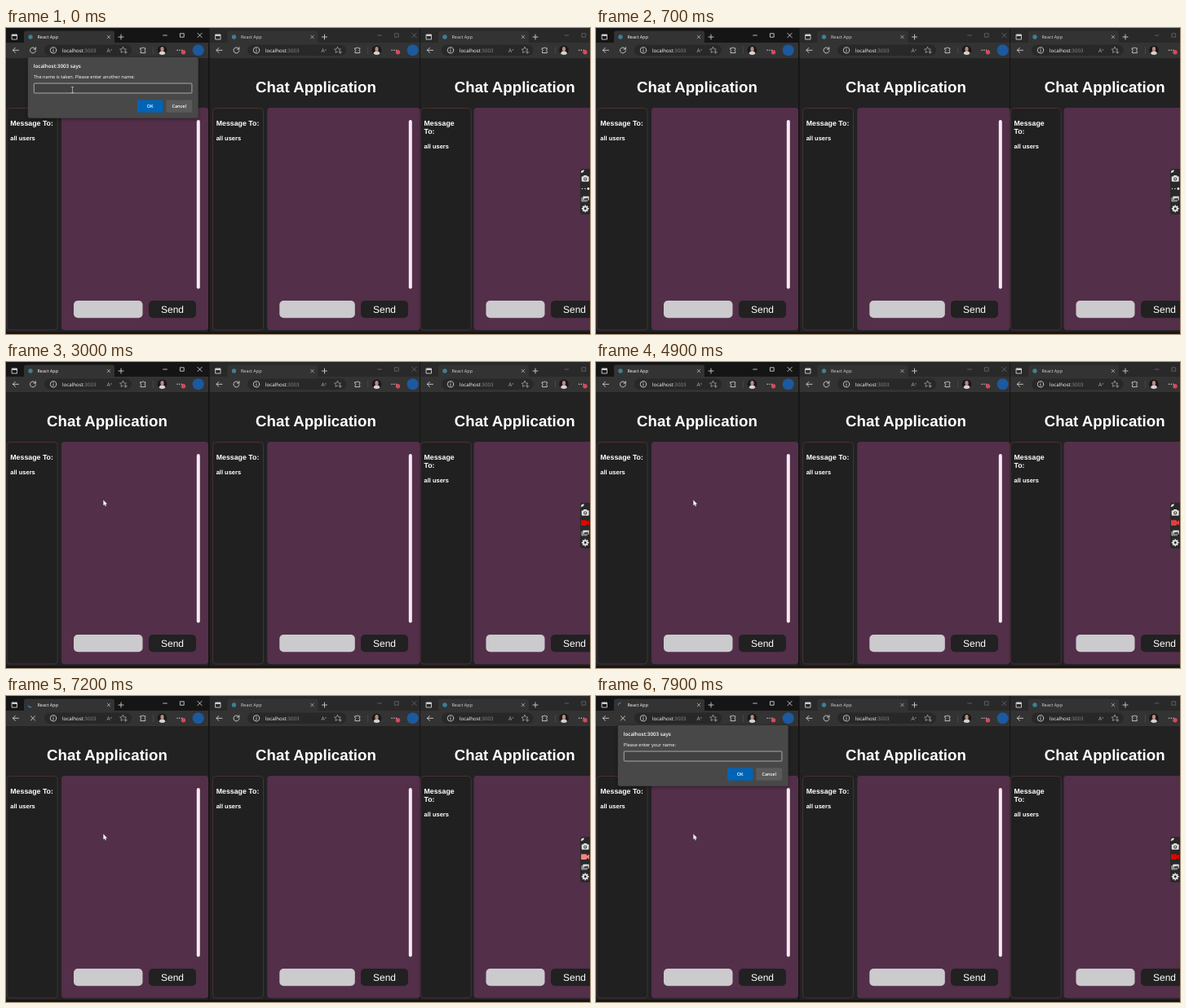
Write an HTML page that moves like this. It is 716x376 px and loops after 8 s.

```html
<!DOCTYPE html>
<html lang="en">
<head>
<meta charset="utf-8">
<title>Chat Application</title>
<style>
  html, body { margin: 0; width: 100%; height: 100%; overflow: hidden; background: #222; }
  svg { display: block; width: 716px; height: 376px; text-rendering: geometricPrecision; }
  text { font-family: "Open Sans", "Noto Sans", sans-serif; fill: #fff; white-space: pre; }
  .page { font-family: "Liberation Sans", Arial, sans-serif; }
  .bold { font-weight: 700; }
  .semi { font-weight: 600; }
  .mid { text-anchor: middle; }
  .line { fill: none; stroke: #d0d0d0; stroke-width: .9; stroke-linecap: round; stroke-linejoin: round; }
  .panel { filter: drop-shadow(0 1px 2px rgba(0, 0, 0, .45)); }
</style>
</head>
<body>
<svg id="stage" viewBox="0 0 716 376" xmlns="http://www.w3.org/2000/svg"></svg>
<script>
const LOOP = 8000;

// Drawing helpers
const rect = (x, y, w, h, fill, r = 0, extra = '') =>
  `<rect x="${x}" y="${y}" width="${w}" height="${h}" rx="${r}" fill="${fill}" ${extra}/>`;
const dot = (x, y, r, fill) => `<circle cx="${x}" cy="${y}" r="${r}" fill="${fill}"/>`;
const line = (d, extra = '') => `<path class="line" d="${d}" ${extra}/>`;
const text = (x, y, size, str, cls = '', extra = '') =>
  `<text x="${x}" y="${y}" font-size="${size}" class="${cls}" ${extra}>${str}</text>`;
const group = (x, y, body, id = '') =>
  `<g transform="translate(${x} ${y})"${id ? ` id="${id}"` : ''}>${body}</g>`;

const icons = {
  tabs: line('M-3-3H3V3H-3Z') + rect(-3, -3, 6, 2, '#d0d0d0'),
  back: line('M3.5 0H-3.5M-.6-3L-3.6 0L-.6 3'),
  reload: line('M3.2-1.4A3.5 3.5 0 1 0 3.5 .6M3.4-3.6V-1.2H1'),
  cross: line('M-2.6-2.6L2.6 2.6M2.6-2.6L-2.6 2.6'),
  plus: line('M-3 0H3M0-3V3'),
  info: line('M3.7 0A3.7 3.7 0 1 1-3.7 0A3.7 3.7 0 1 1 3.7 0M0-.3V1.8M0-1.8V-1.7'),
  star: line('M-.5-4L.7-1.5L3.4-1.2L1.5 .6M-.5 1.8L-3 3.1L-2.5 .5L-4.4-1.2L-1.7-1.5L-.5-4M1 2.5H4.4M2.7 .8V4.2',
    'style="stroke:#aaa;stroke-width:.75"'),
  puzzle: line('M-3-2.5H-1A1.2 1.2 0 0 1 1.3-2.5H2.8V-.8A1.1 1.1 0 0 0 2.8 1.3V3.3H-3V1.3A1.1 1.1 0 0 0-3-.8Z'),
  avatar: dot(0, 0, 5.8, '#1a1719') +
    '<path d="M-4 4.2Q-3 .9 0 .9T4 4.2Q0 7.3-4 4.2" fill="#d8d0d2"/>' +
    '<ellipse cy="-1.4" rx="2.1" ry="2.8" fill="#b58c80"/>',
  more: [-3.4, -.6, 2.2].map(x => dot(x, 0, .75, '#d0d0d0')).join('') + dot(4, 2.4, 2.7, '#d9485c'),
  minimise: line('M-2.3 0H2.3'),
  maximise: line('M-2.2-2.2H2.2V2.2H-2.2Z'),
};

function browser(w) {
  const { x, end, right, url } = w;
  const put = (name, px, py, id) => group(px, py, icons[name], id);
  const controls = put('minimise', 195 + right, 9) + put('maximise', 216 + right, 9) +
    put('cross', 237.5 + right, 9);
  return rect(x, 0, end - x, 376, '#222') +
    rect(x, 0, end - x, 18.5, w.active ? '#151515' : '#292929') +
    rect(x + 22, 3.5, 111, 18, '#333', 3) +
    rect(x, 18, end - x, 19, '#333') +
    rect(url - 22, 20.5, 154 + right - url + 22, 13.5, '#282828', 6.5) +
    put('tabs', x + 10.5, 11) +
    dot(x + 30, 11, 2.7, '#3c8196') +
    text(x + 38.5, 13.1, 5.45, 'React App', '', w.active ? '' : 'opacity=".8"') +
    group(x + 126, 11, `<g transform="scale(.7)">${icons.cross}</g>`) +
    put('plus', x + 141, 11) +
    (w.active ? controls : `<g opacity=".35">${controls}</g>`) +
    put('back', x + 12, 27.3) +
    (w.reload ? put('reload', x + 33, 27.3) : '') +
    put('info', url - 11, 27.3) +
    text(url, 29.5, 6.15, 'localhost<tspan fill="#8f8f8f">:3003</tspan>') +
    text(123.5 + right, 30, 6.6, 'A<tspan dy="-2" font-size="4.5">»</tspan>', '', 'opacity=".65"') +
    put('star', 144 + right, 27.3) + put('puzzle', 168 + right, 27.3) +
    rect(180.5 + right, 23, .6, 9, '#555') +
    put('avatar', 191.5 + right, 27.3) + put('more', 213.5 + right, 27.3) +
    dot(235.7 + right, 27.3, 7, '#1c599f');
}

function chat(w) {
  const { side, panel, end, input, send } = w;
  const label = (y, size, str) => text(side + 4.7, y, size, str, 'page bold');
  return text(w.centre, 79, 18.7, 'Chat Application', 'page bold mid') +
    rect(side + .5, 98.5, 62, 272.5, '#202020', 4, 'stroke="#503236" stroke-width=".9"') +
    (w.narrow
      ? label(120, 8.8, 'Message') + label(130, 8.8, 'To:') + label(147.9, 7.5, 'all users')
      : label(120, 8.8, 'Message To:') + label(138, 7.5, 'all users')) +
    rect(panel, 98, w.narrow ? 180 : end - panel, 273.3, '#532f49', 4) +
    (w.narrow ? '' : rect(send + 58.8, 113, 4, 207.5, '#f5ebf3', 2)) +
    rect(input, 335, w.inputWidth, 21.3, '#cbcacd', 5) +
    rect(send, 335, 58, 21.3, '#212121', 5) +
    text(send + 29, 349.8, 12, 'Send', 'page mid');
}

const windows = [
  { x: 508, end: 716, right: 492.5, url: 556, side: 507.8, panel: 573.5, centre: 623.7,
    input: 588.5, inputWidth: 72, send: 668, narrow: true },
  { x: 249.5, end: 507.5, right: 263, url: 318, reload: true, side: 253, panel: 320.3, centre: 380,
    input: 335.3, inputWidth: 92.5, send: 435 },
  { x: 0, end: 248, right: 0, url: 69, reload: true, active: true, side: .6, panel: 68, centre: 124,
    input: 83, inputWidth: 84.5, send: 175 },
];

const dialog = '<g id="dialog">' +
  rect(26.7, 36, 209, 74.7, '#484848', 2.5, 'class="panel"') +
  text(33.8, 48.6, 6.25, 'localhost:3003 says', 'semi') +
  text(33.8, 62, 5.67, '', '', 'id="message"') +
  rect(34.3, 68, 193.6, 12, '#414141', .8, 'stroke="#a8a8a8" stroke-width="1"') +
  rect(37.6, 70.5, .8, 7, '#fff', 0, 'id="caret"') +
  rect(161, 88.4, 31.5, 15.4, '#0064b6', 1.5) + text(176.7, 98.1, 5.5, 'OK', 'semi mid') +
  rect(196.2, 88.4, 32, 15.4, '#5a5a5a', 1.5) + text(212.2, 98.1, 5.5, 'Cancel', 'semi mid') + '</g>';

const gear = [0, 45, 90, 135].map(a => rect(-.9, -4.4, 1.8, 8.8, '#ddd', .4, `transform="rotate(${a})"`)).join('');
const recorder = '<path d="M716 173H707Q704 173 704 176V226Q704 229 707 229H716Z" fill="#292929"/>' +
  '<path d="M704.7 178.2L705.6 175.2L708.8 174.2L708 177Z" fill="#eee"/>' +
  rect(705.7, 182.3, 9, 6.5, '#ddd', 1) + rect(708.2, 181, 4, 2, '#ddd', .5) +
  dot(710.2, 185.4, 2, '#292929') + dot(710.2, 185.4, 1.1, '#ddd') +
  `<g id="waiting">${dot(706.5, 197.5, .8, '#ddd') + dot(710, 197.5, .8, '#ddd') + dot(713.9, 197.5, 1.4, '#fff')}</g>` +
  '<path id="record" d="M705.8 194.3H711Q712 194.3 712 195.3V196.4L715 194.5V200.7L712 198.8V200Q712 201 711 201H705.8Q705 201 705 200V195.3Q705 194.3 705.8 194.3"/>' +
  rect(705.4, 208, 7.5, 5.6, '#aaa', .8) + rect(707, 206.4, 8, 5.6, '#ddd', .8, 'stroke="#292929" stroke-width=".6"') +
  '<path d="M708 211.2L710 208.8L711.2 210L712.5 208.2L714.2 211.2Z" fill="#292929"/>' +
  group(710.2, 222, gear + dot(0, 0, 3.2, '#ddd') + dot(0, 0, 1.4, '#292929'));

const pointers =
  `<g id="beam">${line('M-1.3-3.6H1.3M0-3.6V3.6M-1.3 3.6H1.3', 'style="stroke-width:.7;stroke:#c8c8c8"')}</g>` +
  '<path id="arrow" d="M0 0V7.4L1.6 6L2.6 8.3L4 7.7L3 5.5H5.2Z" fill="#fff" stroke="#222" stroke-width=".3"/>';

const stage = document.getElementById('stage');
stage.innerHTML = rect(0, 0, 716, 376, '#191919') +
  windows.map(w => browser(w) + chat(w)).join('') +
  rect(0, 373.5, 716, 2.5, '#151515') + rect(248, 0, 1.3, 376, '#141414') + rect(507.3, 0, .8, 98, '#151515') +
  `<g id="busy">${rect(25, 6, 10, 10, '#333')}
    <path id="spinner" class="line" style="stroke:#4a9ade" d="M-2.8 0A2.8 2.8 0 0 1 0-2.8"/>
    ${rect(28, 22, 10, 11, '#333') + group(33, 27.3, icons.cross)}</g>` +
  dialog + recorder + pointers;

const el = id => document.getElementById(id);
const set = (id, name, value) => el(id).setAttribute(name, value);
const show = (id, on) => set(id, 'visibility', on ? 'visible' : 'hidden');
const clamp = v => Math.min(1, Math.max(0, v));
const progress = (t, from, to) => clamp((t - from) / (to - from));
const ease = v => v * v * (3 - 2 * v);

// Start time and colour of each state of the record light
const RED = '#df0505', MID = '#e23e3e', SOFT = '#ec6868', PALE = '#f08484';
const light = [
  [1800, RED], [2200, MID], [2400, PALE], [2700, RED], [3400, MID], [3600, PALE],
  [3900, RED], [4400, MID], [4600, PALE], [4900, MID], [5100, RED], [5600, SOFT],
  [5900, PALE], [6400, RED], [6900, PALE], [7300, SOFT], [7400, RED],
];

function render(t) {
  const reopened = t >= 7100;
  const presence = reopened ? progress(t, 7210, 7320) : 1 - progress(t, 540, 680);
  const lift = reopened ? 3.6 * (1 - progress(t, 7300, 7400)) : 4 * (1 - presence);
  show('dialog', presence > 0);
  set('dialog', 'opacity', presence);
  set('dialog', 'transform', `translate(0 ${-lift})`);
  el('message').textContent = reopened
    ? 'Please enter your name:' : 'The name is taken. Please enter another name:';
  set('caret', 'opacity', (t >= 100 && t < 500) || (t >= 7250 && t < 7750) ? 1 : 0);

  show('busy', reopened);
  set('spinner', 'transform', `translate(30 11) rotate(${(t - 7900) * .675})`);

  const state = light.filter(([start]) => start <= t).pop();
  show('waiting', !state);
  show('record', state);
  if (state) set('record', 'fill', state[1]);

  const move = ease(progress(t, 1750, 2600));
  const x = 81.5 + 37.7 * move, y = 76 + 93.2 * move;
  const overText = y < 80;
  show('beam', overText);
  show('arrow', !overText);
  set('beam', 'transform', `translate(${x} ${y})`);
  set('arrow', 'transform', `translate(${x} ${y})`);
}

const began = performance.now();
function tick() {
  render((performance.now() - began) % LOOP);
  requestAnimationFrame(tick);
}
tick();
</script>
</body>
</html>
```
